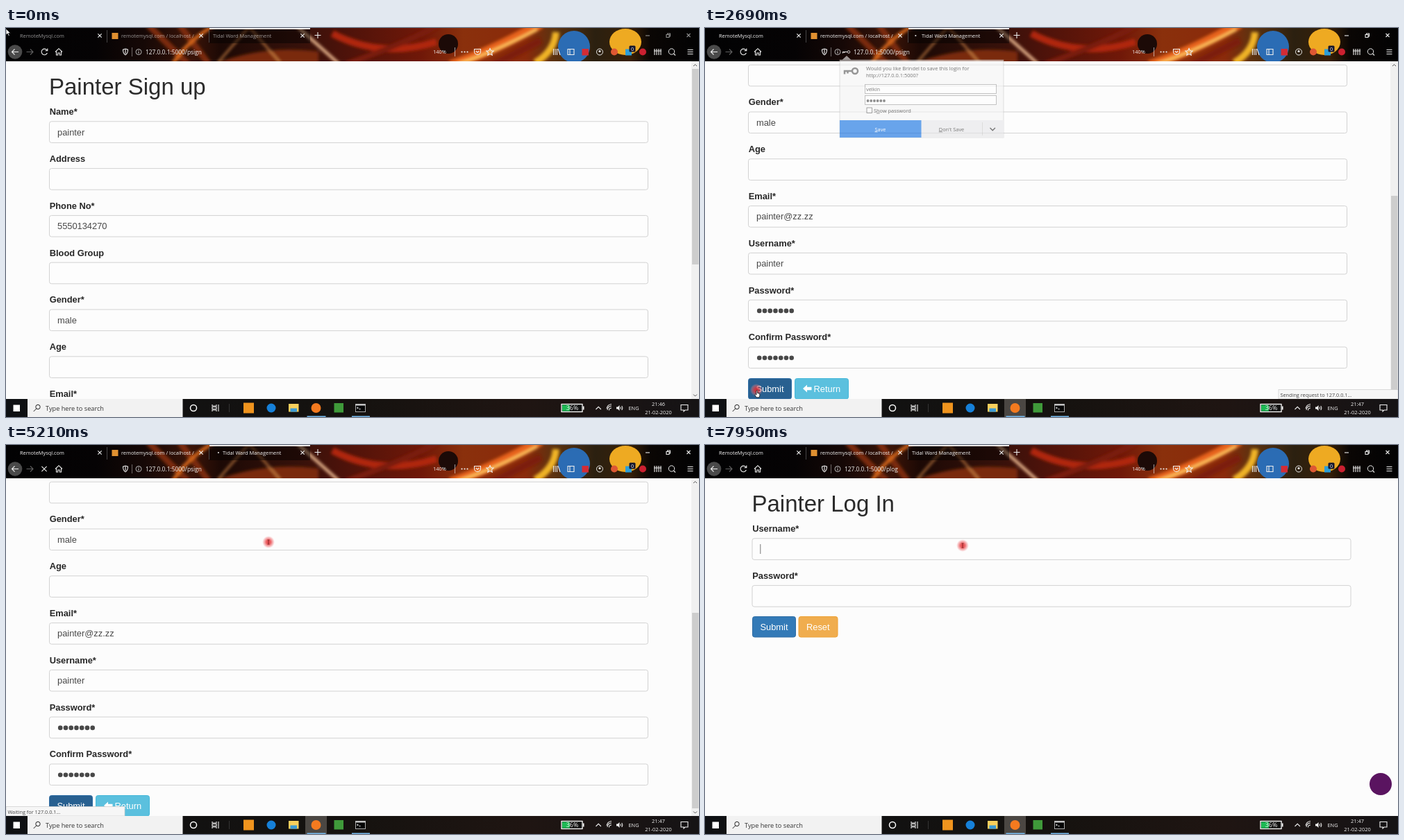
An HTML page that plays this animation: 998x561 px, repeating every 7990 ms.

```html
<!DOCTYPE html>
<html lang="en">
<head>
<meta charset="utf-8">
<title>Sign up</title>
<style>
html, body { margin: 0; height: 100%; overflow: hidden; background: #fcfcfc; }
svg { display: block; width: 100vw; height: 100vh; }
text { font: 7.4px "Open Sans", "Noto Sans", sans-serif; white-space: pre; }
.page text { font: 12.85px "Liberation Sans", Arial, sans-serif; fill: #484848; }
.page .h1 { font-size: 33px; fill: #2b2b2b; }
.page .label { font-weight: bold; fill: #262626; }
.page .btn { fill: #fff; }
.line { fill: none; stroke: #eee; stroke-width: 1.1; }
.white { fill: #f4f4f4; }
</style>
</head>
<body>
<svg id="stage" viewBox="0 0 998 561" preserveAspectRatio="none"></svg>
<script>
const LOOP = 7990, SCROLL = 285, ROW = 67.8;
const stage = document.getElementById('stage');

const text = (x, y, s, attrs = '') => `<text x="${x}" y="${y}" ${attrs}>${s}</text>`;
const rect = (x, y, w, h, fill, attrs = '') =>
  `<rect x="${x}" y="${y}" width="${w}" height="${h}" fill="${fill}" ${attrs}/>`;
const circle = (x, y, r, fill, attrs = '') => `<circle cx="${x}" cy="${y}" r="${r}" fill="${fill}" ${attrs}/>`;
const line = (d, attrs = '') => `<path class="line" d="${d}" ${attrs}/>`;
const cross = (x, y, r, attrs) => line(`M${x - r} ${y - r}l${2 * r} ${2 * r}m0 ${-2 * r}l${-2 * r} ${2 * r}`, attrs);
const dots = (x, y, n, step, r) =>
  Array.from({ length: n }, (_, i) => circle(x + i * step, y, r, '#484848')).join('');
const gradient = stops => stops.map(([at, color, alpha = 1]) =>
  `<stop offset="${at}" stop-color="${color}" stop-opacity="${alpha}"/>`).join('');

const field = (x, i, label, value = '') => {
  const y = 134.8 + i * ROW;
  return text(x - .3, y - 9.6, label, 'class="label"') +
    rect(x - .5, y, 862, 30.6, '#fdfdfd', 'rx="3" stroke="#d2d2d2"') +
    (value === '*' ? dots(x + 15.2, y + 15.7, 7, 7.75, 3.3) : text(x + 11, y + 19.7, value));
};
const button = (x, y, w, label, fill, border, dx = 11.5, id = '') =>
  rect(x + .5, y + .5, w - 1, 29.5, fill, `rx="3" stroke="${border}" ${id}`) +
  text(x + dx, y + 19.5, label, 'class="btn"');

const signup = () => [
  ['Name*', 'painter'], ['Address'], ['Phone No*', '5550134270'], ['Blood Group'], ['Gender*', 'male'],
  ['Age'], ['Email*', 'painter@zz.zz'], ['Username*', 'painter'], ['Password*', '*'], ['Confirm Password*', '*']
].map(([label, value], i) => field(63, i, label, value)).join('') +
  text(62, 96, 'Painter Sign up', 'class="h1"') +
  button(62, 790, 63, 'Submit', '#337ab7', '#2e6da4', 11.5, 'id="submit"') +
  button(129, 790, 78, 'Return', '#5bc0de', '#46b8da', 27.5) +
  '<path d="M141 805l6-5.5v3.2h6.5v4.6h-6.5v3.2z" fill="#fff"/>';

const login = () => text(67.5, 96, 'Painter Log In', 'class="h1"') +
  field(68.5, 0, 'Username*') + field(68.5, 1, 'Password*') +
  button(68, 247, 63, 'Submit', '#337ab7', '#2e6da4') + button(134.5, 247, 57, 'Reset', '#f0ad4e', '#eea236') +
  rect(79.3, 143, 1, 14, '#777', 'id="caret"') +
  `<g id="chat">${circle(0, 0, 16, '#5a1460')}</g>`;

const theme = () => `<g clip-path="url(#header)">` + rect(0, 0, 998, 48, 'url(#sky)') +
  `<g filter="url(#soft)" fill="none">
  <path d="M205 -4L262 52M250 -4L292 52" stroke="#7c2c0c" stroke-width="9"/>
  <path d="M240 52Q262 18 300 -4" stroke="#d8681c" stroke-width="5"/>
  <path d="M300 52Q370 24 450 34V52z" fill="#7a2b0b"/>
  <path d="M305 50L352 -4M395 50L348 -4" stroke="#d98c4a" stroke-width="2"/>
  <path d="M415 -6L482 54" stroke="#f2c096" stroke-width="4"/>
  <path d="M470 8Q540 45 620 20" stroke="#b0260e" stroke-width="10"/>
  <path d="M490 52Q580 20 622 -4" stroke="#7a1a0a" stroke-width="8"/>
  <path d="M640 54Q700 34 770 -6" stroke="#e8641a" stroke-width="14"/>
  <path d="M650 52Q705 34 765 2" stroke="#ffc860" stroke-width="4"/>
  <path d="M700 54L770 18" stroke="#7c1c08" stroke-width="10"/>
  <path d="M762 50Q790 34 792 6" stroke="#f0b428" stroke-width="10"/></g>` +
  circle(637, 23, 14, '#1c0a07') + circle(818, 27, 23, '#2b6cb4') +
  '<ellipse cx="892" cy="20" rx="23" ry="19" fill="#eeaa22"/></g>' +
  rect(293, 2, 145, 20, '#000', 'opacity=".45"') + rect(293, 0, 145, 1.8, '#f4f4f4') +
  rect(145, 3, .8, 18, '#555') + rect(292, 3, .8, 18, '#555');

const chrome = () => theme() +
  `<g id="titles" class="white">${text(20, 14, 'RemoteMysql.com')}
   <g clip-path="url(#tab)">${text(166, 14, 'remotemysql.com / localhost / ')}</g>
   ${text(0, 14, 'Tidal Ward Management', 'id="title"')}
   ${line('M921 11h6')}${line('M951 9.5h4v4h-4zM952.5 9.5v-1.5h4v4h-1.5')}${cross(983, 10.5, 2.5)}</g>` +
  rect(152.5, 7, 9, 9, '#e09030') +
  [135, 281, 427].map(x => cross(x, 11, 2.7, 'stroke-width="1.4"')).join('') +
  line('M449 6v9M444.5 10.5h9', 'stroke-width="1.4"') + circle(0, 11, 1.1, '#ddd', 'id="dot"') +
  circle(13, 34.5, 10.3, '#4a4a4a') +
  line('M18 34.5H8.5m4-4l-4 4 4 4', 'stroke-width="1.6"') +
  line('M29.5 34.5h9.5m-4-4l4 4-4 4', 'opacity=".4"') +
  `<g id="reload">${line('M59 32a4.3 4.3 0 1 0 .4 4M59.8 29.5v3.2h-3.2', 'stroke-width="1.5"')}</g>
   <g id="stop">${cross(55, 34.5, 3.6, 'stroke-width="1.6"')}</g>` +
  line('M71 34.5l5-4.8 5 4.8M72.5 34v5h2.2v-3h2.6v3h2.2v-5', 'stroke-width="1.5"') +
  line('M172 30l3.5 1.2q0 5.5-3.5 7.5-3.5-2-3.5-7.5zM172 31v6') + line('M181.5 28v13', 'opacity=".4"') +
  circle(191, 34.5, 4, 'none', 'stroke="#bbb"') + rect(190.5, 33.8, 1, 3, '#ccc') + rect(190.5, 32, 1, 1, '#ccc') +
  `<g id="key">${circle(207, 34.5, 1.8, 'none', 'stroke="#ccc"')}${line('M205 34.5h-6.5v2m2-2v1.5')}</g>` +
  text(0, 38, '127.0.0.1:5000/psign', 'id="url" class="white" style="font-size:8.4px"') +
  text(615, 37.3, '140%', 'class="white"') + line('M646.5 28v13', 'opacity=".6"') +
  [656.5, 660.5, 664.5].map(x => circle(x, 34.5, 1.1, '#eee')).join('') +
  line('M674.5 30.5h9v3.5a4.5 4.5 0 0 1-9 0zM676.7 33l2.3 2.3 2.3-2.3') +
  line('M697 29.5l1.5 3.3 3.6.4-2.7 2.4.8 3.5-3.2-1.8-3.2 1.8.8-3.5-2.7-2.4 3.6-.4z') +
  line('M788.5 30v9M791 30v9M793.5 30v9M795 30l3 9', 'stroke-width="1.5"') +
  line('M809 30.5h9v8h-9zM812 30.5v8') + rect(829.5, 30, 9.5, 9.5, '#d32c35') +
  circle(855, 34.5, 4.5, 'none', 'stroke="#eee"') + circle(855, 33.5, 1.6, '#eee') + circle(876, 34.5, 5, '#de5833') +
  rect(892, 30.5, 9, 9, '#2d9fd8') + rect(897.5, 25.5, 9, 9, '#16162c', 'rx="1.5"') +
  text(902, 32.8, '0', 'class="white" text-anchor="middle"') + circle(917, 34.5, 5, '#cc2030') +
  line('M934 30v9M937 30v9M940 30v9M943 30v9M933 33h11') +
  circle(958.5, 34, 4.2, 'none', 'stroke="#eee"') + line('M961.5 37l2.5 2.5') +
  line('M981.5 31.5h8m-8 3h8m-8 3h8', 'stroke-width="1.5"');

const taskbar = () => rect(0, 535, 998, 26, 'url(#bar)') + rect(31, 535, 223.5, 26, '#f2f2f2') +
  rect(10.5, 543.5, 9.5, 9.5, '#fff') +
  `<g stroke="#222" fill="none">${circle(46, 546.5, 3.2, 'none')}<path d="M43.7 549l-4 4"/></g>` +
  text(57, 551.5, 'Type here to search', 'fill="#333" style="font-size:9.2px"') +
  circle(270, 548, 4.5, 'none', 'stroke="#fff" stroke-width="1.5"') +
  line('M297 543v2h6v-2M297 553v-2h6v2M297 546.5h6v3h-6zM306 543v10') + rect(321, 542, .7, 12, '#444') +
  rect(431, 535, 31, 26, '#4b4743', 'id="task"') +
  rect(342, 540.5, 15, 15, '#f0941e') + circle(382, 548, 6.5, '#1680d8') +
  rect(407, 542, 14.5, 11.5, '#f7cf5c') + rect(409.5, 548.5, 9.5, 5, '#3c9bd6') +
  circle(446.5, 548, 7, '#f47a1f') + rect(472.5, 541, 13.5, 13.5, '#3f9a3a') +
  rect(503.5, 542.5, 14, 11, '#050505', 'stroke="#aaa"') + rect(503.5, 542.5, 14, 2, '#ccc') +
  line('M505.5 547l1.5 1-1.5 1m3 .5h2', 'stroke-width=".7"') +
  rect(433.5, 559.5, 27, 1.5, '#76b9ed') + rect(498, 559.5, 26, 1.5, '#76b9ed') +
  rect(800, 542.5, 30, 11, '#111', 'stroke="#fff" stroke-width="1.3"') +
  rect(801, 543.5, 11, 9, '#1db954') + rect(831, 545.5, 1.5, 5, '#fff') +
  text(815.5, 551.3, '36%', 'class="white" text-anchor="middle" style="font-size:9px"') +
  line('M849.5 550l3.7-3.7 3.7 3.7') +
  line('M866 551a6 6 0 0 1 6-6M868.5 551.5a3.5 3.5 0 0 1 3.5-3.5M865 549a8 8 0 0 1 7-6.5', 'stroke-width=".9"') +
  '<path class="white" d="M879 546.5h2l2.5-2.5v8l-2.5-2.5h-2z"/>' +
  line('M885 546.5q1.2 1.5 0 3M886.7 545q2.2 3 0 6', 'stroke-width=".8"') +
  `<g class="white">${text(896.5, 551, 'ENG')}${text(939.5, 544.7, '', 'id="clock" text-anchor="middle"')}
   ${text(939.5, 556.7, '21-02-2020', 'text-anchor="middle"')}</g>` +
  line('M972 543.5h10v7.5h-4l-2 2v-2h-4z');

const popup = () => `<path d="M197 46.5l7-6.5 7 6.5z" fill="#f5f5f5"/>` +
  rect(194, 46, 236, 112, '#f5f5f5', 'stroke="#bbb" stroke-width=".7"') +
  `<g fill="none" stroke="#555" stroke-width="2.5">${circle(216, 62, 4, 'none')}<path d="M212 62h-11v4.5m4.5-4.5v3.5"/></g>
  <g fill="#222">${text(232, 61, 'Would you like Brindel to save this login for')}${text(232, 71, 'http://127.0.0.1:5000?')}
  ${rect(230.5, 81.5, 189, 13, '#fff', 'stroke="#888" stroke-width=".8"')}${text(232, 90.7, 'velkin')}
  ${rect(230.5, 97.5, 189, 13, '#fff', 'stroke="#888" stroke-width=".8"')}${dots(234.5, 105, 6, 4.7, 1.9)}
  ${rect(233, 115, 7.5, 7.5, '#fff', 'stroke="#444" stroke-width=".8"')}
  ${text(243, 121.7, 'S<tspan text-decoration="underline">h</tspan>ow password')}
  ${rect(311, 133, 119, 25, '#e6e6e8')}${rect(194, 133, 117.5, 25, '#0a6be0')}${rect(399, 136, .7, 19, '#bbb')}
  ${text(355, 148.5, '<tspan text-decoration="underline">D</tspan>on\'t Save', 'text-anchor="middle"')}
  ${text(252.5, 148.5, '<tspan text-decoration="underline">S</tspan>ave', 'text-anchor="middle" fill="#fff"')}</g>` +
  line('M410.5 144l3.7 3.7 3.7-3.7', 'style="stroke:#222;stroke-width:1.4"');

const status = (id, x, w, label) => `<g id="${id}">${rect(x, 521.5, w, 13.5, '#f6f6f6', 'stroke="#ccc" stroke-width=".7"')}
  ${text(x + 2.5, 531.7, label, 'fill="#444" style="font-size:7.3px"')}</g>`;

stage.innerHTML = `<defs>
  <linearGradient id="sky">${gradient([[0, '#020203'], [.13, '#050304'], [.2, '#160806'], [.27, '#3a1408'],
    [.31, '#1c0905'], [.42, '#35110a'], [.48, '#4a120a'], [.6, '#701808'], [.66, '#8a300c'], [.75, '#8a2a0a'],
    [.79, '#5c3210'], [.85, '#2b2010'], [.9, '#382008'], [.93, '#0a0604'], [1, '#020203']])}</linearGradient>
  <linearGradient id="bar">${gradient([[0, '#0e1013'], [.5, '#15120f'], [.75, '#1f1512'], [1, '#151315']])}</linearGradient>
  <radialGradient id="halo">${gradient([[0, '#e0282c', .9], [.4, '#e83a3e', .75], [.75, '#f07074', .4],
    [1, '#f49a9a', 0]])}</radialGradient>
  <filter id="soft" filterUnits="userSpaceOnUse" x="180" y="-20" width="640" height="90"><feGaussianBlur stdDeviation="2"/></filter>
  <clipPath id="tab"><rect x="166" width="105" height="22"/></clipPath>
  <clipPath id="header"><rect width="998" height="48"/></clipPath>
  <clipPath id="view"><rect y="48" width="998" height="487"/></clipPath></defs>
  ${rect(0, 0, 998, 561, '#fcfcfc')}
  <g id="signup" class="page" clip-path="url(#view)"><g id="form">${signup()}</g>
    ${rect(987, 48, 11, 487, '#f0f0f0')}${rect(988, 59, 9.5, 282, '#cdcdcd', 'id="thumb"')}
    <path d="M990 55l2.5-2.5 2.5 2.5M990 528.5l2.5 2.5 2.5-2.5" fill="none" stroke="#555"/></g>
  <g id="login" class="page">${login()}</g>
  ${status('sending', 826, 172, 'Sending request to 127.0.0.1...')}${status('waiting', 0, 171, 'Waiting for 127.0.0.1...')}
  ${taskbar()}${chrome()}<g id="popup">${popup()}</g>
  <g id="pointer">${circle(0, 0, 9, 'url(#halo)', 'id="glow"')}
    <path id="arrow" d="M0-1v9l2.1-2 1.6 3.5 1.5-.7-1.6-3.3h2.9z" fill="#fff" stroke="#111" stroke-width=".8"/>
    <path id="hand" d="M0 1q1.5-1 1.7.5v3l3 .8q.8 2.5-.7 5.5h-4l-2.5-4 1-.7 1.5 1z" fill="#fff" stroke="#111" stroke-width=".8"/>
    <path id="beam" d="M-1.5-3h3M0-3v6m-1.5 0h3" fill="none" stroke="#7a2020" stroke-width=".8"/></g>`;

const el = Object.fromEntries([...stage.querySelectorAll('[id]')].map(node => [node.id, node]));
const show = (name, on) => el[name].setAttribute('display', on ? 'inline' : 'none');
const set = (name, attrs) => { for (const key in attrs) el[name].setAttribute(key, attrs[key]); };
const progress = (t, from, to) => Math.min(1, Math.max(0, (t - from) / (to - from)));

// Pointer moves: start, end, then the place reached.
const moves = [[1550, 1680, 62, 529], [2020, 2060, 67, 525], [2060, 2180, 74, 522],
  [2830, 3190, 378, 140], [7890, 7950, 371, 145]];
function pointerAt(t) {
  if (t < 500) return [0, 2];
  let x = 240, y = 397;
  for (const [from, to, toX, toY] of moves) {
    const p = progress(t, from, to), k = p * p * (3 - 2 * p);
    x += (toX - x) * k;
    y += (toY - y) * k;
  }
  return [x, y];
}

function draw(t) {
  const started = t >= 500, active = t >= 2430, loaded = t >= 7150, loading = active && !loaded;
  const scroll = started ? SCROLL * (1 - (1 - progress(t, 470, 820)) ** 3) : 0;
  set('form', { transform: `translate(0 ${-scroll})` });
  set('thumb', { y: 59 + scroll * 183 / SCROLL });
  show('signup', !loaded);
  show('login', loaded);
  show('caret', t >= 7280);
  set('chat', { transform: `translate(973 489) scale(${progress(t, 7570, 7700)})` });

  const [x, y] = pointerAt(t);
  const hover = started && !loaded && x < 125 && y > 505;
  const typing = loaded || (t > 2900 && !hover);
  set('pointer', { transform: `translate(${x} ${y})` });
  show('glow', started);
  show('hand', hover);
  show('beam', typing);
  show('arrow', !hover && !typing);
  set('submit', { fill: hover || t >= 4330 ? '#286090' : '#337ab7' });

  const keyed = t >= 2590 && t < 4350;
  show('key', keyed);
  set('url', { x: keyed ? 214 : 201 });
  el.url.textContent = '127.0.0.1:5000/' + (loaded ? 'plog' : 'psign');
  set('popup', { opacity: progress(t, 2600, 2750) * (1 - progress(t, 4190, 4280)) });

  show('sending', t >= 2510 && t < 2900);
  show('waiting', t >= 2900 && !loaded);
  show('stop', t >= 2790 && !loaded);
  show('reload', t < 2790 || loaded);
  show('dot', loading);
  set('dot', { cx: 305.5 + 3 * Math.cos(2 * Math.PI * ((t - 2690) / 800 + .62)) });
  set('title', { x: loading ? 312 : 298 });
  set('titles', { opacity: active ? 1 : .6 });
  show('task', active);
  el.clock.textContent = started ? '21:47' : '21:46';
}

function tick() {
  draw(performance.now() % LOOP);
  requestAnimationFrame(tick);
}
tick();
</script>
</body>
</html>
```
